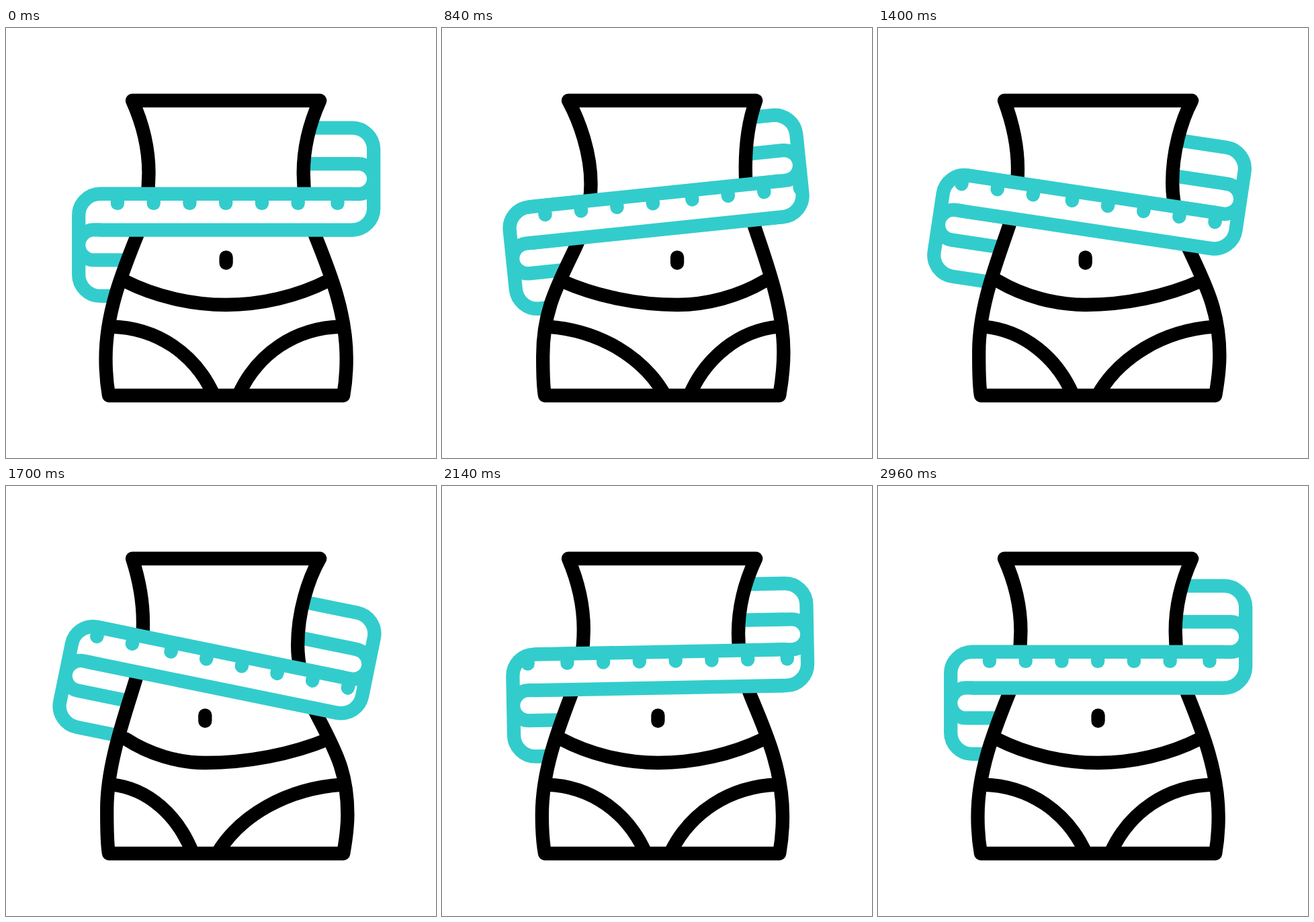
Write an HTML page that moves like this. It is 640 by 640 pixels and loops after 3000 ms.

```html
<!DOCTYPE html>
<html lang="en">
<head>
<meta charset="utf-8">
<title>Waist measuring</title>
<style>
  html, body { margin: 0; width: 100%; height: 100%; overflow: hidden; background: #fff; }
  svg { display: block; width: 100vw; height: 100vh; }
  path { fill: none; stroke: #000; stroke-width: 20.3; stroke-linecap: round; stroke-linejoin: round; }
  #body { fill: #fff; }
  #fold, #edges, #ticks { stroke: #33cccc; }
  #band { fill: #fff; stroke: none; }
</style>
</head>
<body>
<svg viewBox="0 0 640 640">
  <defs>
    <path id="fold" d="M70-125.2H187.5a32 32 0 0 1 32 32V-5.2a32 32 0 0 1-32 32H0M70-71.7H197a22.5 22.5 0 0 1 0 45H0"/>
    <clipPath id="front">
      <path d="M219.5-26.8H-187.5a32 32 0 0 0-32 32V26.8H187.5a32 32 0 0 0 32-32z"/>
    </clipPath>
  </defs>
  <g class="tape">
    <use href="#fold"/>
    <use href="#fold" transform="rotate(180)"/>
  </g>
  <path id="body"/>
  <path id="lines"/>
  <g class="tape">
    <path id="band" d="M-187-26.8H187V26.8H-187z"/>
    <path id="edges" d="M-187-26.8H187M-187 26.8H187"/>
    <g clip-path="url(#front)"><path id="ticks"/></g>
  </g>
</svg>
<script>
const $ = id => document.getElementById(id);
const LOOP = 3000, START = 100, RIGHT = 560, LEFT = 1740, END = 2300;
const AXIS = 327.6, SWAY = 31.5, SHIFT = 1.7;
const PERIOD = 327.5, GAP = 53.75;

const mix = (a, b, k) => a + (b - a) * k;
const clamp = k => Math.max(0, Math.min(1, k));
const smooth = k => k * k * (3 - 2 * k);
const sineOut = k => Math.sin(k * Math.PI / 2);

// keys: [time, value, easing into this key]
function tween(t, ...keys) {
  let i = 1;
  while (i < keys.length - 1 && t > keys[i][0]) i++;
  const [t0, a] = keys[i - 1], [t1, b, ease = smooth] = keys[i];
  return mix(a, b, ease(clamp((t - t0) / (t1 - t0))));
}

// Bezier points of one half; dir is -1 for left, 1 for right.
// sway bends the figure sideways, active is 0 only at rest.
function half(dir, sway, active) {
  const lean = -dir * sway;
  const shift = dir * SHIFT * active;
  const place = points => points.map(([x, y]) => [AXIS + dir * x, y]);

  const waistX = 115.1 - 10.3 * lean + shift, waistY = 216 + 17 * lean + 4 * active;
  const flankX = 133 - 2 * lean + shift, flankY = 310 + 26 * lean;
  const hipX = 179.1 + shift, hipY = 492 - 7 * active + 4 * lean;
  const slopeX = 11.6 + 3 * lean, slopeY = 29;
  const navelX = -SWAY * lean, beltX = 151 + shift;
  const legX = 171.6 + shift, crotchX = 18.6 + navelX;

  return {
    side: place([
      [139.6, 108], [125.6 - 4 * lean, 139], [waistX, mix(waistY, 108, .37)], [waistX, waistY],
      [waistX, mix(waistY, flankY, .36)], [flankX - slopeX, flankY - slopeY], [flankX, flankY],
      [flankX + 1.85 * slopeX, flankY + 1.85 * slopeY], [hipX, hipY - 68], [hipX, hipY],
      [hipX, hipY + 20], [177.6, 530], [174.6, 547]]),
    belt: place([
      [beltX, 376.5], [mix(navelX, beltX, .7), 399.5], [mix(navelX, beltX, .34), 412], [navelX, 412]]),
    leg: place([
      [legX, 444.5], [mix(legX, crotchX, .45), 446 + 4 * active],
      [mix(legX, crotchX, .82), 485 + 6 * active], [crotchX, 546]])
  };
}

const curve = ([first, ...rest], start = "M") => `${start}${first}C${rest.join(" ")}`;

function drawBody(t) {
  const sway = tween(t, [START, 0], [RIGHT, 1], [LEFT, -1], [END, 0]);
  const active = tween(t, [START, 0], [RIGHT, 1], [LEFT, 1], [END, 0]);
  const l = half(-1, sway, active), r = half(1, sway, active);
  $("body").setAttribute("d", curve(l.side) + curve(r.side.reverse(), "L") + "Z");
  $("lines").setAttribute("d", [l.belt, r.belt, l.leg, r.leg].map(p => curve(p)).join("")
    + `M${AXIS + SWAY * sway} 341.3v8.5`);
}

function drawTape(t) {
  const x = tween(t, [START, 0], [1700, -13.7, sineOut], [2330, 0]);
  const angle = tween(t, [START, 0], [480, -10.75], [1680, 11.6], [2390, -6.1], [2555, 2.1], [2930, 0]);
  for (const g of document.querySelectorAll(".tape"))
    g.setAttribute("transform", `translate(${327.7 + x} 273.75) rotate(${angle})`);
  const slide = PERIOD * clamp((t - START) / (END - START));
  $("ticks").setAttribute("transform", `translate(${-slide})`);
}

// Six marks to a period, with a wider gap between periods
let marks = "";
for (let n = 0; n < 18; n++)
  marks += `M${-161.75 + Math.floor(n / 6) * PERIOD + n % 6 * GAP}-26.8V-12.8`;
$("ticks").setAttribute("d", marks);

function loop() {
  const t = performance.now() % LOOP;
  drawBody(t);
  drawTape(t);
  requestAnimationFrame(loop);
}
loop();
</script>
</body>
</html>
```
